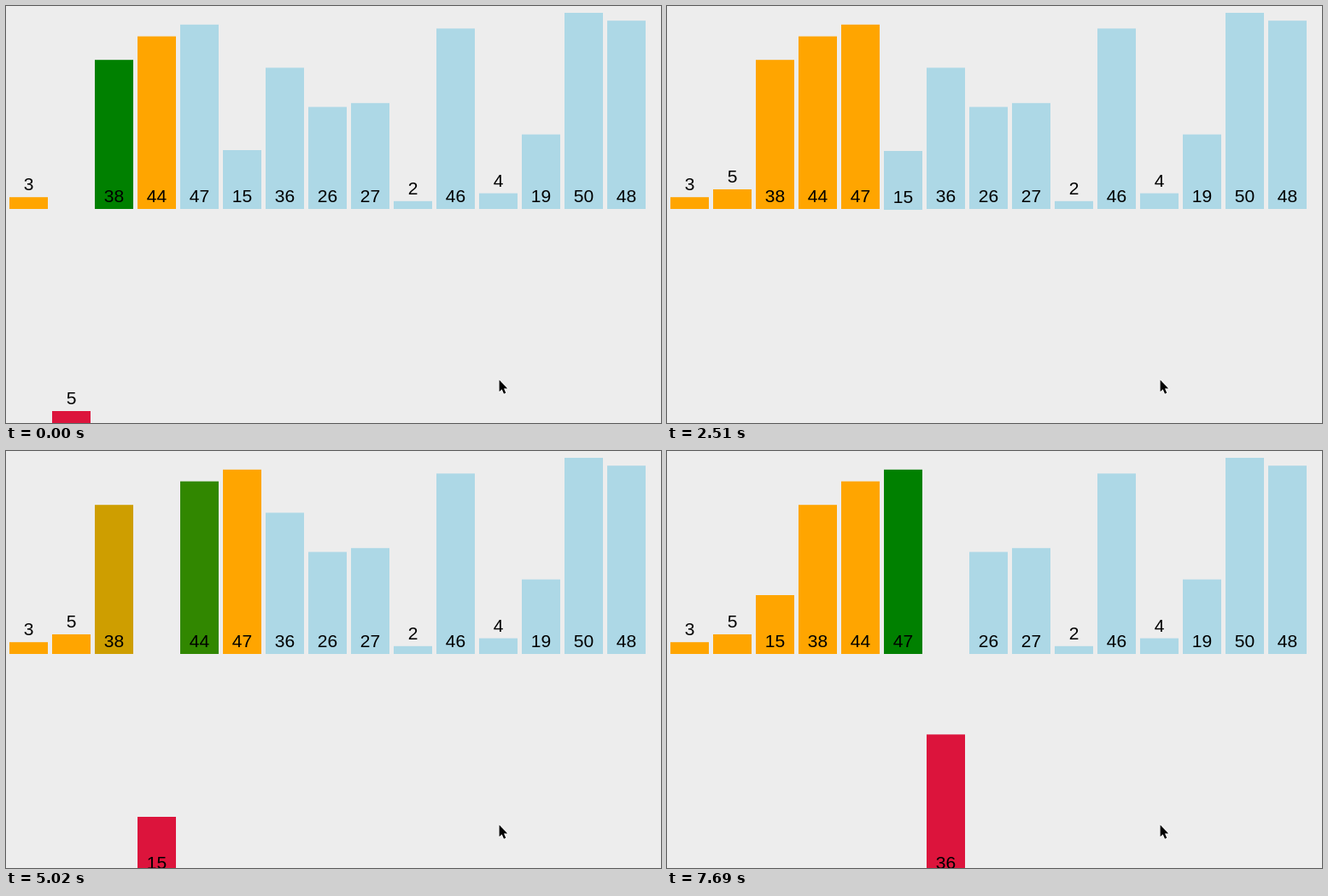
Recreate the animation shown at these times as an HTML page. Size 767 by 489 pixels, loop 7990 ms.

```html
<!DOCTYPE html>
<html lang="en">
<head>
<meta charset="utf-8">
<title>Insertion sort</title>
<style>
  html, body { margin: 0; width: 100%; height: 100%; overflow: hidden; background: #ededed; }
  svg { display: block; width: 100%; height: 100%; }
  text { font: 21px "Liberation Sans", Arial, Helvetica, sans-serif; text-anchor: middle; fill: #000; }
  .pointer { fill: #000; stroke: #fff; stroke-width: 1.6; paint-order: stroke; stroke-linejoin: round; }
</style>
</head>
<body>
<svg viewBox="0 0 767 489">
  <g id="bars"></g>
  <path class="pointer" d="M577.6 438.6V452.2L580.7 449.4L583 454.8L585.3 453.8L583 448.5H587.2Z"/>
</svg>
<script>
const LOOP = 7990, TICK = LOOP / 54;   // the picture advances in even ticks
const EASE_TICKS = 1.7;
const BASE = 238, UNIT = 4.6, PITCH = 50, WIDTH = 45, DROP = 260;
const BLUE = [173, 216, 230], ORANGE = [255, 165, 0], GREEN = [0, 128, 0], RED = [220, 20, 60];

const values = [3, 5, 38, 44, 47, 15, 36, 26, 27, 2, 46, 4, 19, 50, 48];

const paint = color => ({ color });
const lift = { drop: 0, color: ORANGE };
const lower = { drop: 1, color: RED };
const at = slot => ({ slot });

// Each step: start tick, then the new properties of the bars by value
const steps = [
  [0.1, { 38: paint(ORANGE), 3: paint(GREEN) }],
  [3.45, { 5: lift, 3: paint(ORANGE) }],
  [6.72, { 47: lower }],
  [10.1, { 44: paint(GREEN) }],
  [13.45, { 47: lift, 44: paint(ORANGE) }],
  [16.83, { 15: lower }],
  [20.12, { 47: paint(GREEN) }],
  [23.49, { 15: at(4), 47: at(5) }],
  [26.8, { 47: paint(ORANGE), 44: paint(GREEN) }],
  [30.1, { 15: at(3), 44: at(4) }],
  [33.38, { 44: paint(ORANGE), 38: paint(GREEN) }],
  [36.75, { 15: at(2), 38: at(3) }],
  [40.15, { 38: paint(ORANGE), 5: paint(GREEN) }],
  [43.45, { 15: lift, 5: paint(ORANGE) }],
  [46.75, { 36: lower }],
  [50.1, { 47: paint(GREEN) }]
];

const mix = (a, b, p) => Array.isArray(a) ? a.map((v, i) => mix(v, b[i], p)) : a + (b - a) * p;
const ease = p => p < 0.5 ? 4 * p ** 3 : 1 - 4 * (1 - p) ** 3;

function add(parent, tag, attrs) {
  const el = document.createElementNS("http://www.w3.org/2000/svg", tag);
  for (const key in attrs) el.setAttribute(key, attrs[key]);
  return parent.appendChild(el);
}

const root = document.getElementById("bars");
const bars = values.map((value, slot) => {
  const height = value * UNIT;
  const group = add(root, "g", {});
  const rect = add(group, "rect", { y: BASE - height, width: WIDTH, height });
  const middle = value < 10 ? BASE - height - 15 : BASE - 15;
  add(group, "text", { x: WIDTH / 2, y: middle + 7.2 }).textContent = value;
  const start = { slot, drop: 0, color: slot < 4 ? ORANGE : BLUE };
  if (value === 5) Object.assign(start, lower);
  if (value === 38) start.color = GREEN;
  return { value, group, rect, start };
});

function draw(tick) {
  for (const { value, group, rect, start } of bars) {
    const state = { ...start };
    for (const [begin, changes] of steps) {
      if (tick <= begin) break;
      const p = ease(Math.min(1, (tick - begin) / EASE_TICKS));
      const goal = changes[value];
      for (const key in goal) state[key] = mix(state[key], goal[key], p);
    }
    group.setAttribute("transform", `translate(${4 + state.slot * PITCH} ${state.drop * DROP})`);
    rect.setAttribute("fill", `rgb(${state.color.map(Math.round)})`);
  }
}

const origin = performance.now();
function frame() {
  const time = (performance.now() - origin) % LOOP;
  draw(Math.min(53, Math.floor((time + 14) / TICK)));
  requestAnimationFrame(frame);
}
frame();
</script>
</body>
</html>
```
